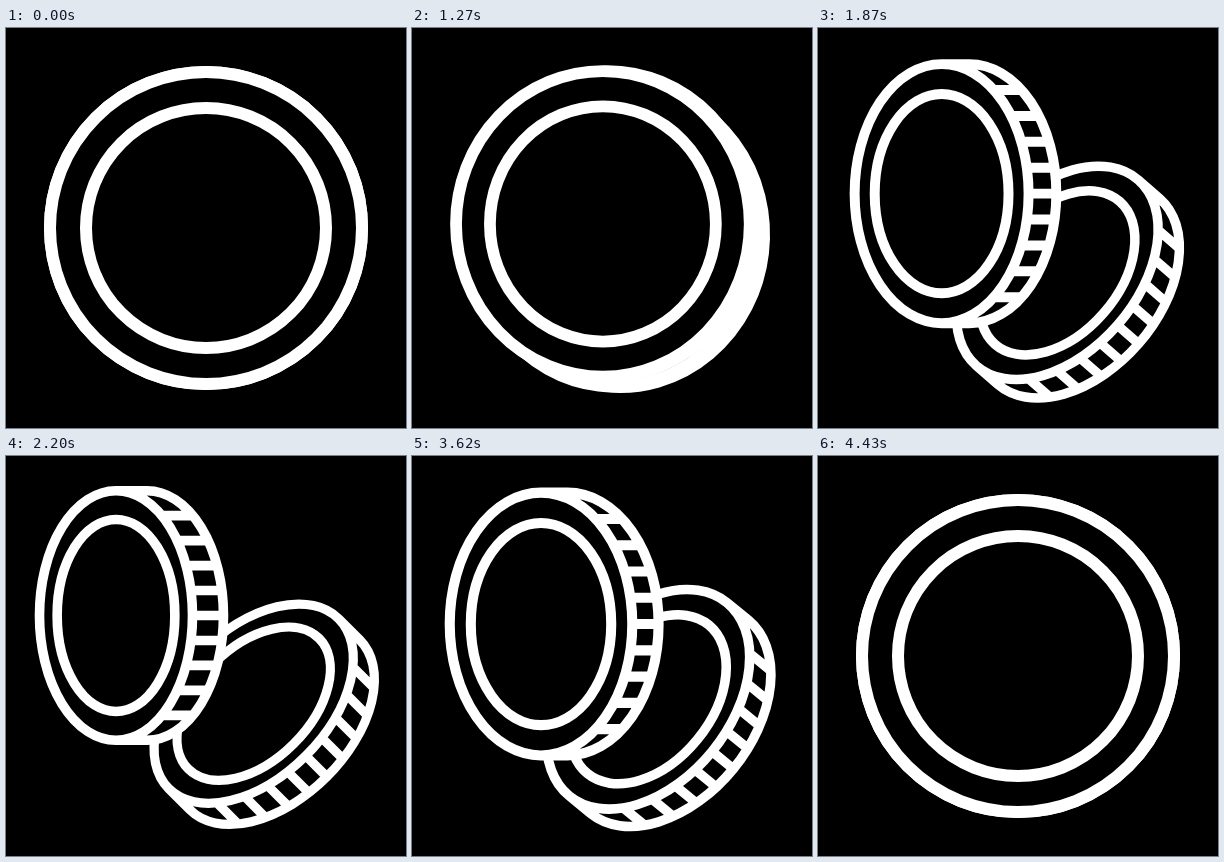
Write an HTML page that moves like this. It is 400 px wide and 400 px high and loops after 4.46 s.

```html
<!DOCTYPE html>
<html lang="en">
<head>
<meta charset="utf-8">
<title>Two coins</title>
<style>
  html, body { margin: 0; width: 100%; height: 100%; overflow: hidden; background: #000; }
  svg { display: block; width: 100%; height: 100%; }
  path { fill: #000; stroke: #fff; stroke-linejoin: round; }
</style>
</head>
<body>
<svg viewBox="0 0 400 400">
  <path id="back"/>
  <path id="front"/>
</svg>
<script>
const LOOP = 4460, MOVE = 1200, STEP = 30;
const OPEN = 1000, CLOSE = 3230;
const RADIUS = 156, INNER = 120 / 156, LINE = 12, DEPTH = 38.75, SQUEEZE = 0.387;

const front = document.getElementById('front');
const back = document.getElementById('back');

const easeInOut = u => u < 0.5 ? 2 * u * u : 1 - 2 * (1 - u) * (1 - u);

// Eased progress of a move, advancing in 30 ms steps.
function progress(t, start) {
  const elapsed = Math.floor((t - start) / STEP) * STEP;
  return easeInOut(Math.min(1, Math.max(0, elapsed / MOVE)));
}

function ellipse(rx, ry) {
  return `M${-rx},0A${rx},${ry} 0 1 1 ${rx},0A${rx},${ry} 0 1 1 ${-rx},0Z`;
}

// Rim, face, inner ring, then the ridges between face and rim.
function coinPath(rx, ry, depth) {
  let d = `M0,${-ry}H${depth}A${rx},${ry} 0 0 1 ${depth},${ry}H0`;
  d += ellipse(rx, ry) + ellipse(rx * INNER, ry * INNER);
  for (let k = -4; k <= 4; k++) {
    const y = k / 5;
    d += `M${rx * Math.sqrt(1 - y * y)},${y * ry}h${depth}`;
  }
  return d;
}

function drawCoin(el, turn, shrink, x, y, angle) {
  const scale = 1 - shrink * turn;
  const ry = RADIUS * scale;
  const depth = DEPTH * scale * turn * (1.1 - 0.1 * turn);
  el.setAttribute('d', coinPath(ry * (1 - SQUEEZE * turn), ry, depth));
  el.setAttribute('stroke-width', LINE * scale);
  el.setAttribute('transform', `translate(${x} ${y}) rotate(${angle})`);
}

function draw(t) {
  const p = progress(t, OPEN) - progress(t, CLOSE);
  const bow = p * (1 - p);
  const lead = p + 0.5 * bow;
  drawCoin(front, p, 0.2, 200 - 90 * p, 200 - 40.5 * p, 0);
  drawCoin(back, lead, 0.23, 200 + 47.7 * p - 9 * bow, 200 + 47.7 * p + 34 * bow, 45 * lead);
}

const began = performance.now();
function tick() {
  draw((performance.now() - began) % LOOP);
  requestAnimationFrame(tick);
}
tick();
</script>
</body>
</html>
```
